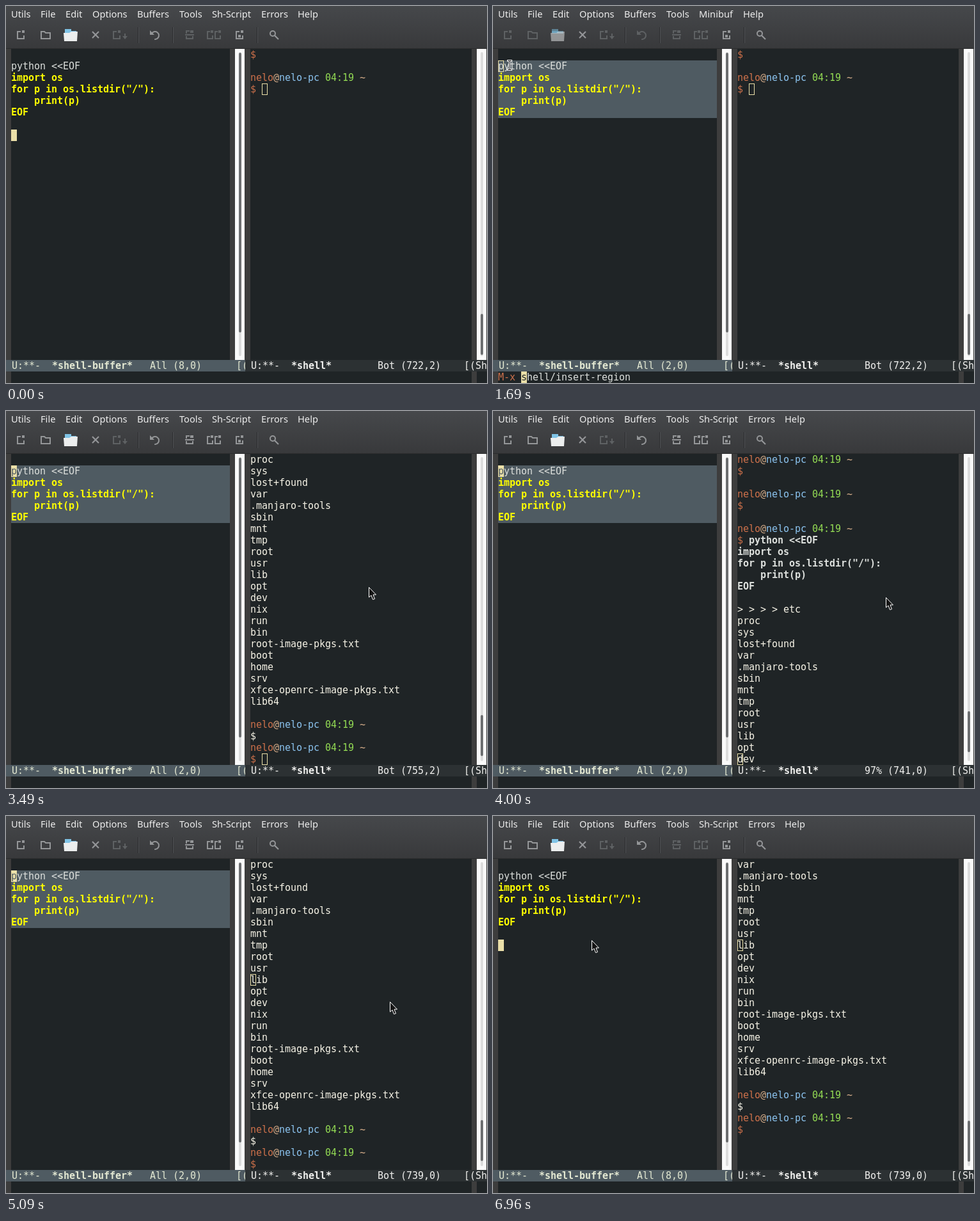
Animation of 752x589 px, one loop 7.62 s. Source, as an HTML page with a canvas:

```html
<!DOCTYPE html>
<html lang="en">
<head>
<meta charset="utf-8">
<title>Shell insert region</title>
<style>
html, body { margin: 0; width: 100%; height: 100%; overflow: hidden; background: #1f2426; }
canvas { display: block; width: 752px; height: 589px; }
</style>
</head>
<body>
<canvas id="stage" width="752" height="589"></canvas>
<script>
const ctx = document.getElementById('stage').getContext('2d');
const LOOP = 7620, CELL = 9, ROW = 18, TOP = 67, ROWS = 27, HEIGHT = ROW * ROWS;
const LEFT = 8, RIGHT = 382, MODE = TOP + HEIGHT, ECHO = MODE + ROW;
const MONO = '15px "DejaVu Sans Mono", monospace';
const BG = '#1f2426', FRINGE = '#3d3d3d', REGION = '#4f5b62', CURSOR = '#eadfa8';
const PLAIN = '#dcdfdc', IVORY = '#f6f3e6', YELLOW = '#ffff00';
const ORANGE = '#cd714b', TAN = '#d9b08c', BLUE = '#8cc4f0', GREEN = '#94dc54';
const ICON = '#949698', DIM = '#5e6163';

// Moments of the session, in ms
const MARK = 40, DRAG = 190, DRAGGED = 650, ASK = 1270, RECALL = 1690, RUN = 2220, DONE = 2300,
  LEAVE = 3000, SCROLL = 3680, RETURN = 5090, CLICK = 5450;

const script = ['', 'python <<EOF', 'import os', 'for p in os.listdir("/"):', '    print(p)', 'EOF'];
const output = ('> > > > etc|proc|sys|lost+found|var|.manjaro-tools|sbin|mnt|tmp|root|usr|lib|opt|dev|nix|run|bin|' +
  'root-image-pkgs.txt|boot|home|srv|xfce-openrc-image-pkgs.txt|lib64|').split('|');
const prompt = [['nelo', ORANGE], ['@', TAN], ['nelo-pc', BLUE], [' 04:19', GREEN], [' ~', TAN]];

// Pointer moves: start, end, x, y
const moves = [
  [DRAG, DRAGGED, 10, 92], [DRAGGED, 910, 26, 92], [2750, 2750, 30, 89], [LEAVE, 3640, 614, 291],
  [RETURN, 5550, 166, 258], [5860, 6050, 347, 274], [6050, 6290, 127, 224], [6290, 6480, 166, 176],
  [6670, 6960, 154, 194]
];

const clamp = (v, lo, hi) => Math.max(lo, Math.min(hi, v));
const ease = k => k * k * (3 - 2 * k);
const during = (t, from, to) => t >= from && t < to;

// Steps taken so far by something that moves at regular intervals
const steps = (t, from, gap, count) => clamp(Math.floor((t - from) / gap) + 1, 0, count);

function pointerAt(t) {
  if (t < DRAG) return null;
  let x = 10, y = 186;
  for (const [from, to, toX, toY] of moves) {
    if (t < from) break;
    const k = t >= to ? 1 : ease(Math.min(1, (Math.floor((t - from) / 48) + 1) * 48 / (to - from)));
    x += (toX - x) * k;
    y += (toY - y) * k;
  }
  return { x: Math.round(x), y: Math.round(y) };
}

// First visible line and cursor line of the shell window
function shellView(t) {
  const last = t < RUN ? 722 : t < DONE ? 728 : 755;
  const up = steps(t, SCROLL, 53, 8);
  const down = steps(t, 4460, 40, 3) + steps(t, 4750, 40, 4) + steps(t, RETURN, 50, 3);
  return {
    last,
    top: t < DONE ? 719 : Math.min(732, 729 + 2 * (down - up)),
    point: last - 2 * up
  };
}

function box(x, y, w, h, color) {
  ctx.fillStyle = color;
  ctx.fillRect(x, y, w, h);
}

function clipped(x, y, w, h, draw) {
  ctx.save();
  ctx.beginPath();
  ctx.rect(x, y, w, h);
  ctx.clip();
  draw();
  ctx.restore();
}

// Terminal text: one glyph per cell; returns the x after the text
function type(text, x, y, color, bold) {
  ctx.font = (bold ? 'bold ' : '') + MONO;
  ctx.fillStyle = color;
  for (const ch of text) {
    if (ch !== ' ') ctx.fillText(ch, x, y + 14);
    x += CELL;
  }
  return x;
}

function typeParts(parts, x, y) {
  for (const [text, color, bold] of parts) x = type(text, x, y, color, bold);
}

function hollow(x, y) {
  ctx.strokeStyle = CURSOR;
  ctx.lineWidth = 1;
  ctx.strokeRect(x + .5, y + .5, CELL - 1, ROW - 1);
}

function solid(x, y, ch, color) {
  box(x, y, CELL, ROW, CURSOR);
  type(ch, x, y, color);
}

function line(color, width, ...points) {
  ctx.strokeStyle = color;
  ctx.lineWidth = width;
  ctx.beginPath();
  points.forEach(p => ctx.lineTo(...p));
  ctx.stroke();
}

function arc(color, x, y, r, from, to) {
  ctx.strokeStyle = color;
  ctx.lineWidth = 2;
  ctx.beginPath();
  ctx.arc(x, y, r, from, to);
  ctx.stroke();
}

function shape(color, ...points) {
  ctx.fillStyle = color;
  ctx.beginPath();
  points.forEach(p => ctx.lineTo(...p));
  ctx.closePath();
  ctx.fill();
}

function page(x, w, color) {
  line(color, 2, [x + w / 2, 40], [x + 1, 40], [x + 1, 51], [x + w - 1, 51], [x + w - 1, 46]);
  box(x + w - 4, 38, 4, 4, color);
}

function menuBar(mini) {
  ctx.font = '14.67px "Noto Sans", "Open Sans", sans-serif';
  ctx.fillStyle = '#eeeeee';
  let x = 8;
  for (const label of ['Utils', 'File', 'Edit', 'Options', 'Buffers', 'Tools',
    ...(mini ? ['Minibuf'] : ['Sh-Script', 'Errors']), 'Help']) {
    ctx.fillText(label, x, 18);
    x += Math.floor(ctx.measureText(label).width) + 16;
  }
}

function folder(mini) {
  ctx.globalAlpha = mini ? .5 : 1;
  box(92, 36, 10, 6, '#7fc3e6');
  box(92, 39, 18, 4, '#7fc3e6');
  shape('#eceeee', [90, 42], [99, 42], [102, 40], [112, 40], [111, 55], [91, 55]);
  ctx.globalAlpha = 1;
}

function toolBar(mini, marked) {
  const main = mini ? DIM : ICON, edit = marked && !mini ? ICON : DIM;
  page(17, 12, main);
  line(main, 2, [55, 52], [55, 40], [60, 40], [62, 42], [69, 42], [69, 51], [55, 51]);
  folder(mini);

  line(ICON, 2.2, [135, 40], [145, 50]);
  line(ICON, 2.2, [145, 40], [135, 50]);

  page(167, 12, DIM);
  box(185, 43, 2, 5, DIM);
  shape(DIM, [182, 47], [190, 47], [186, 52]);

  arc(main, 233, 46, 6, -2.5, 1.7);
  shape(main, [225, 38], [225, 45], [232, 45]);

  line(edit, 2, [287, 39], [282, 39], [282, 43]);
  box(288, 38, 5, 4, edit);
  box(280, 44, 14, 2, edit);
  line(edit, 2, [282, 47], [282, 51], [292, 51], [292, 47]);

  page(314, 10, edit);
  page(326, 10, edit);

  page(359, 12, ICON);
  box(363, 45, 4, 4, ICON);

  arc(ICON, 417, 43, 4, 0, Math.PI * 2);
  line(ICON, 2.2, [420, 46], [426, 52]);

  for (const x of [206, 260, 392]) {
    box(x, 33, 1, 25, '#2b2c2e');
    box(x + 1, 33, 1, 25, '#505255');
  }
}

function scrollBar(x, y, h) {
  const bar = (top, height, color) => {
    ctx.fillStyle = color;
    ctx.beginPath();
    ctx.roundRect(x + 6, top, 4, height, 2);
    ctx.fill();
  };
  box(x, TOP, 15, HEIGHT, '#fafafa');
  bar(72, 475, '#dcdcdc');
  bar(y, h, '#6c6e70');
}

function frameParts() {
  box(0, 0, 752, 589, BG);
  const shade = ctx.createLinearGradient(0, 0, 0, TOP);
  shade.addColorStop(0, '#46484b');
  shade.addColorStop(1, '#38393b');
  box(0, 0, 752, TOP, shade);
  box(0, TOP - 1, 752, 1, '#2b2c2d');
  for (const x of [0, 350, 374, 728]) box(x, TOP, 8, HEIGHT, FRINGE);
  for (const x of [373, 751]) box(x, TOP, 1, HEIGHT, FRINGE);
  for (const x of [0, 728]) box(x, ECHO, 8, ROW, FRINGE);
}

function modeLine(x, w, bg, color, name, tail) {
  box(x, MODE, w, ROW, bg);
  clipped(x, MODE, w, ROW, () =>
    typeParts([['U:**-  ', color], [name, color, true], [tail, color]], x + 9, MODE));
}

function editor(point, marked, mini) {
  const y = TOP + (point - 1) * ROW;
  if (marked) box(LEFT, y, 342, (7 - point) * ROW, REGION);
  script.forEach((text, i) => type(text, LEFT, TOP + i * ROW, i > 1 ? YELLOW : PLAIN, i > 1));
  if (mini) hollow(LEFT, y);
  else solid(LEFT, y, (script[point - 1] || ' ')[0], marked ? REGION : BG);
  scrollBar(358, 73, 437);
  modeLine(0, 374, REGION, '#e3e8d2', '*shell-buffer*', `   All (${point},0)      [(Sh`);
}

function shellLine(n, last) {
  if (n <= 721) return [prompt, [], [['$', ORANGE]]][(721 - n) % 3];
  if (n === 722) return [['$ ', ORANGE], [last > 722 ? script[1] : '', PLAIN, true]];
  if (n < 728) return [[script[n - 721] || '', PLAIN, true]];
  if (n < 752) return [[output[n - 728], IVORY]];
  return n === 753 ? [['$', IVORY]] : n === 755 ? [['$', ORANGE]] : prompt;
}

function shell(t) {
  const { last, top, point } = shellView(t);
  const col = point === 722 || point === 755 ? 2 : 0;
  clipped(RIGHT, TOP, 346, HEIGHT, () => {
    for (let i = 0; i < ROWS && top + i <= last; i++)
      typeParts(shellLine(top + i, last), RIGHT, TOP + i * ROW);
    hollow(RIGHT + col * CELL, TOP + (point - top) * ROW);
  });
  scrollBar(736, last < 755 ? 481 : Math.round(469 + (top - 715) * .42), 64);
  const where = t < DONE || top >= 729 ? 'Bot' : top >= 719 ? '98%' : '97%';
  modeLine(374, 378, '#2c3133', '#f0f0ee', '*shell*', `        ${where} (${point},${col})    [(Shell`);
}

function echoArea(t) {
  if (during(t, ASK, RUN)) {
    const typed = t >= RECALL ? 'shell/insert-region' : ' ';
    type('M-x', LEFT, ECHO, ORANGE);
    solid(44, ECHO, typed[0], BG);
    type(typed.slice(1), 53, ECHO, PLAIN);
  } else if (during(t, DRAGGED, ASK)) {
    type('Mark set', LEFT, ECHO, PLAIN);
  } else if (during(t, RUN + 40, LEAVE)) {
    type('Text is read-only', LEFT, ECHO, PLAIN);
  }
}

function beam({ x, y }) {
  for (const [color, width, reach] of [['#ffffff', 3, 4], ['#111111', 1, 3]]) {
    box(x - width / 2, y - 7, width, 15, color);
    for (const end of [y - 7, y + 7]) box(x - reach, end + .5 - width / 2, reach * 2, width, color);
  }
}

function arrow({ x, y }) {
  ctx.save();
  ctx.translate(x + .5, y + .5);
  const outline = [[0, 0], [0, 15.5], [3.5, 12.5], [6, 19], [9, 18], [6.5, 11.5], [11, 11.5]];
  ctx.lineJoin = 'round';
  shape('#141414', ...outline);
  line('#ffffff', 1, ...outline, outline[0]);
  ctx.restore();
}

function draw(t) {
  const mouse = pointerAt(t);
  const marked = during(t, MARK, CLICK);
  const lineUnder = mouse ? Math.floor((mouse.y - TOP) / ROW) + 1 : 7;
  const point = !marked ? 8 : t >= DRAGGED ? 2 : clamp(lineUnder, 2, 7);
  const miniBars = during(t, ASK + 50, RUN);

  frameParts();
  menuBar(miniBars);
  toolBar(miniBars, during(t, MARK, 5620));
  editor(point, marked, during(t, ASK, RUN));
  shell(t);
  echoArea(t);
  if (mouse) {
    const overText = t < RETURN && mouse.x < 350 && mouse.y < TOP + 7 * ROW;
    (overText ? beam : arrow)(mouse);
  }
}

const start = performance.now();
function tick() {
  draw((performance.now() - start) % LOOP);
  requestAnimationFrame(tick);
}
tick();
</script>
</body>
</html>
```
